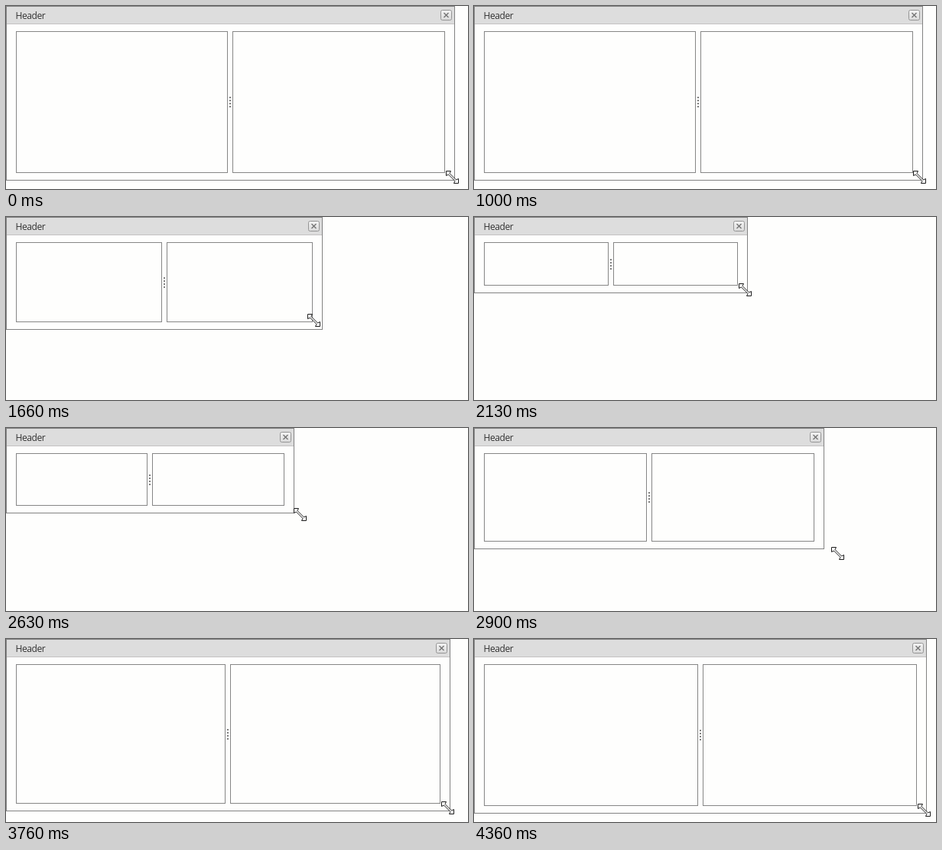
An HTML page with a canvas for the animation above (5400 ms loop, 604x240 px).

```html
<!DOCTYPE html>
<html lang="en">
<head>
<meta charset="utf-8">
<title>Resizable window</title>
<style>
html, body { margin: 0; width: 604px; height: 240px; overflow: hidden; background: #fefefd; }
canvas { display: block; }
</style>
</head>
<body>
<canvas id="stage" width="604" height="240"></canvas>
<script>
const ctx = document.getElementById('stage').getContext('2d');
const LOOP = 5400;
const STEP = 100 / 3;
const LAG = 43; // the window trails the pointer by this many ms

// Turning points of the pointer: [ms, x, y]
const path = [
  [967, 575, 216], [1500, 432, 165], [1667, 394, 127], [2100, 346, 87],
  [2433, 346, 87], [2857, 446, 146], [2900, 467, 156], [3690, 570, 214],
  [3733, 569, 213], [4000, 574, 215], [4167, 574, 215], [4333, 580, 216]
];

function slope(i, axis) {
  const [a, b] = [path[i], path[i + 1]];
  return a && b ? (b[axis] - a[axis]) / (b[0] - a[0]) : 0;
}

// Harmonic mean of the neighbouring slopes, so the curve never overshoots
function tangent(i, axis) {
  const before = slope(i - 1, axis), after = slope(i, axis);
  return before * after > 0 ? 2 * before * after / (before + after) : 0;
}

function pointerAt(ms) {
  const last = path.length - 1;
  const t = Math.min(Math.max(ms, path[0][0]), path[last][0]);
  const i = Math.max(path.findIndex(p => p[0] >= t), 1);
  const a = path[i - 1], b = path[i], span = b[0] - a[0];
  const k = (t - a[0]) / span, ease = k * k * (3 - 2 * k);
  return [1, 2].map(axis => Math.round(
    a[axis] + (b[axis] - a[axis]) * ease +
    span * k * (1 - k) * ((1 - k) * tangent(i - 1, axis) - k * tangent(i, axis))));
}

// One-pixel outline whose edges lie on the given pixels
function outline(left, top, right, bottom, color) {
  ctx.strokeStyle = color;
  ctx.lineWidth = 1;
  ctx.strokeRect(left + .5, top + .5, right - left, bottom - top);
}

function closeButton(x, y) {
  const shade = ctx.createLinearGradient(0, y, 0, y + 14);
  shade.addColorStop(0, '#f4f4f4');
  shade.addColorStop(1, '#dadada');
  ctx.beginPath();
  ctx.roundRect(x + .5, y + .5, 14, 13, 2);
  ctx.fillStyle = shade;
  ctx.fill();
  ctx.strokeStyle = '#959595';
  ctx.lineWidth = 1;
  ctx.stroke();
  ctx.beginPath();
  ctx.moveTo(x + 4.5, y + 4);
  ctx.lineTo(x + 10.5, y + 10);
  ctx.moveTo(x + 10.5, y + 4);
  ctx.lineTo(x + 4.5, y + 10);
  ctx.strokeStyle = '#747474';
  ctx.lineWidth = 1.4;
  ctx.stroke();
}

function drawWindow(right, bottom) {
  ctx.fillStyle = '#dddddd';
  ctx.fillRect(0, 0, right, 23);
  ctx.fillStyle = '#c4c2c2';
  ctx.fillRect(0, 23, right, 1);
  outline(0, 0, right, bottom, '#828282');

  ctx.fillStyle = '#333';
  ctx.font = '12px "Open Sans", "Noto Sans", sans-serif';
  ctx.letterSpacing = '-0.4px';
  ctx.fillText('Header', 12.5, 17);
  closeButton(right - 18, 5);

  const end = right - 13, base = bottom - 10;
  const gap = Math.floor((end + 8) / 2);
  outline(13, 33, gap - 1, base, '#868686');
  outline(gap + 6, 33, end, base, '#868686');

  const top = Math.floor((33 + base) / 2) - 6;
  ctx.fillStyle = '#808080';
  for (let i = 0; i < 4; i++) ctx.fillRect(gap + 2, top + i * 4, 2, 2);
}

const arrow = new Path2D(
  'M.5.5H6.5L5 3.5 13.5 12 16.5 10.5V16.5H10.5L12 13.5 3.5 5 .5 6.5Z');

function drawPointer(x, y) {
  ctx.save();
  ctx.translate(x, y);
  ctx.fillStyle = '#fff';
  ctx.fill(arrow);
  ctx.strokeStyle = '#1c1c1c';
  ctx.lineWidth = 1;
  ctx.stroke(arrow);
  ctx.restore();
}

function draw(now) {
  // Thirty steps a second, each starting on a whole hundredth
  const hundredths = Math.floor(now % LOOP / 10);
  const time = Math.floor((hundredths * 10 + 9) / STEP) * STEP;
  const [x, y] = pointerAt(time - LAG);
  ctx.fillStyle = '#fefefd';
  ctx.fillRect(0, 0, 604, 240);
  drawWindow(x + 11, y + 12);
  drawPointer(...pointerAt(time));
  requestAnimationFrame(draw);
}
requestAnimationFrame(draw);
</script>
</body>
</html>
```
